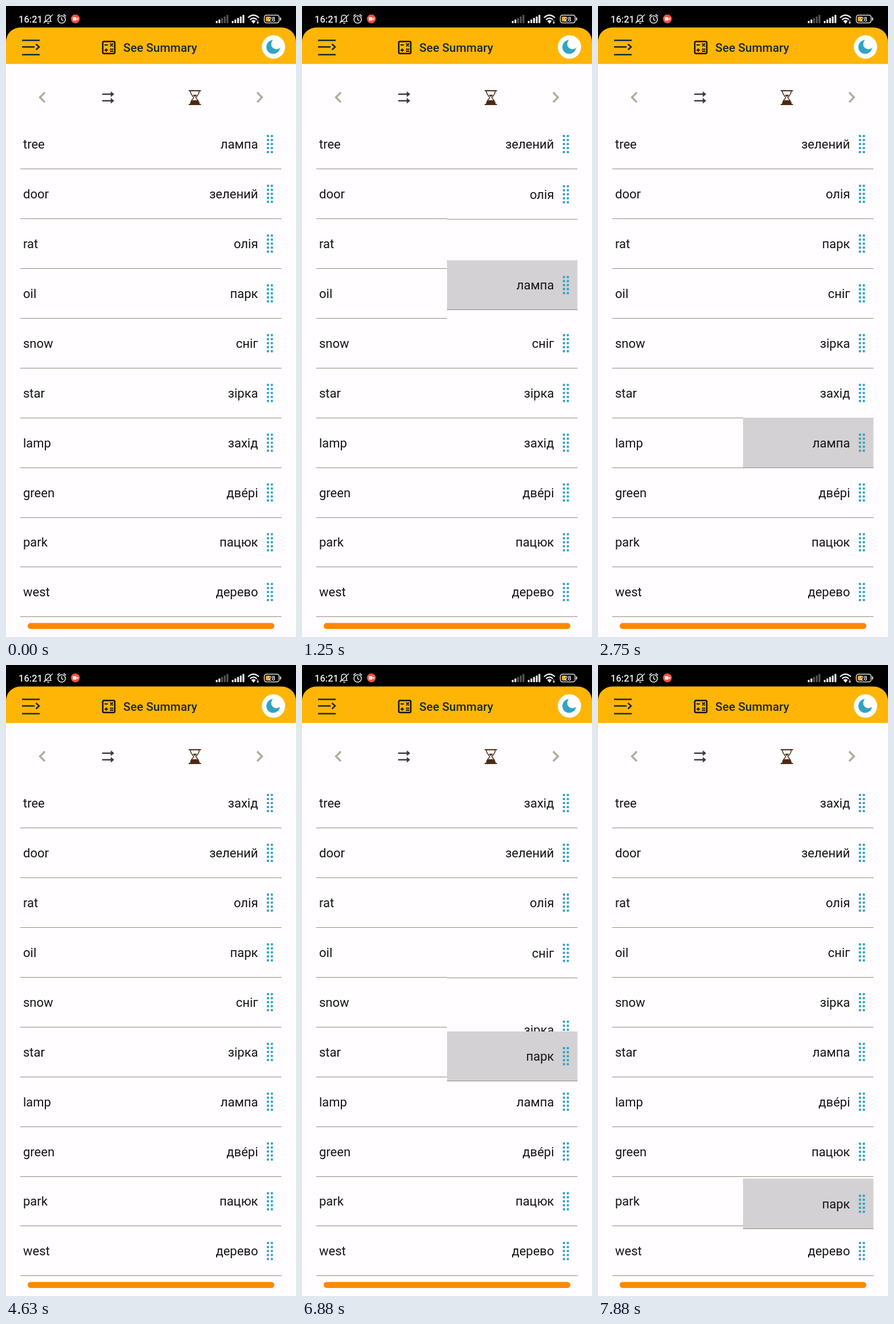
Animation of 508 by 1102 pixels, one loop 8 s. Source, as an HTML page with a canvas:

```html
<!DOCTYPE html>
<html lang="en">
<head>
<meta charset="utf-8">
<style>
html, body { margin: 0; width: 508px; height: 1102px; overflow: hidden; background: #fffdff; }
canvas { display: block; }
</style>
</head>
<body>
<canvas id="stage" width="508" height="1102"></canvas>
<script>
const ctx = document.getElementById('stage').getContext('2d');
const LOOP = 8000, ROW = 86.93, FIRST_LINE = 284.5;
const MID = 254, LEFT = 25, RIGHT = 482.5;
const NAVY = '#12283c', BLUE = '#30a4c4', BACK = '#fffdff', RULE = '#92897e';
const SWAP = 0.7, STIFFNESS = 0.018;

const words = ['tree', 'door', 'rat', 'oil', 'snow', 'star', 'lamp', 'green', 'park', 'west'];
const answers = ['лампа', 'зелений', 'олія', 'парк', 'сніг', 'зірка', 'захід', 'двéрі', 'пацюк', 'дерево'];

// Each path lists [time, rows travelled]
const drags = [
  { from: 0, to: 6, grab: 260, drop: 2870,
    path: [[400, 0], [540, 0.7], [1250, 2.83], [1700, 4.3], [2200, 6.05], [2600, 6.05], [2740, 6]] },
  { from: 5, to: 0, grab: 3280, drop: 4500,
    path: [[3450, 0], [3600, -0.5], [4050, -4], [4280, -5.05], [4380, -5.05], [4470, -5]] },
  { from: 3, to: 8, grab: 6130, drop: 8000,
    path: [[6280, 0], [6510, 0.7], [6797, 1.7], [6880, 2.08], [7200, 3.6], [7560, 5.05], [8000, 5.05]] }
];

function travel(path, t) {
  if (t <= path[0][0]) return 0;
  for (let i = 1; i < path.length; i++) {
    const [t0, p0] = path[i - 1], [t1, p1] = path[i];
    if (t <= t1) return p0 + (p1 - p0) * (t - t0) / (t1 - t0);
  }
  return path[path.length - 1][1];
}

function crossing(path, distance) {
  for (let i = 1; i < path.length; i++) {
    const t0 = path[i - 1][0], t1 = path[i][0];
    const p0 = Math.abs(path[i - 1][1]), p1 = Math.abs(path[i][1]);
    if (p0 < distance && p1 >= distance) return t0 + (t1 - t0) * (distance - p0) / (p1 - p0);
  }
  return Infinity;
}

function spring(ms) {
  if (ms <= 0) return 0;
  const x = ms * STIFFNESS;
  return 1 - (1 + x) * Math.exp(-x);
}

function box(color, x, y, w, h, r = 0) {
  ctx.fillStyle = color;
  ctx.beginPath();
  ctx.roundRect(x, y, w, h, r);
  ctx.fill();
}

function disc(color, x, y, r) {
  ctx.fillStyle = color;
  ctx.beginPath();
  ctx.arc(x, y, r, 0, 7);
  ctx.fill();
}

function line(color, width, d) {
  ctx.strokeStyle = color;
  ctx.lineWidth = width;
  ctx.stroke(new Path2D(d));
}

function shape(color, d) {
  ctx.fillStyle = color;
  ctx.fill(new Path2D(d));
}

function text(s, x, y, font, color = '#151515', align = 'left') {
  ctx.font = font + ' Roboto, sans-serif';
  ctx.fillStyle = color;
  ctx.textAlign = align;
  ctx.fillText(s, x, y);
}

function statusBar() {
  box('#000', 0, 0, 508, 70);
  text('16:21', 22, 29, '500 16.5px', '#eee');
  // muted bell and alarm clock
  line('#ddd', 1.6, 'M67 27H80M69 27V21Q69 16 73.5 16T78 21V27M72 30H76M66 30L82 15');
  line('#ddd', 1.7, 'M104 23.5A6.5 6.5 0 1 1 91 23.5A6.5 6.5 0 1 1 104 23.5M97.5 19.5V24L100.5 25.5M90 18L94 14.5M105 18L101 14.5');
  disc('#f4503f', 121.5, 22.5, 7.8);
  box('#fff', 117, 19.5, 6.5, 6, 1);
  shape('#fff', 'M124 22.5L126.5 20V25Z');
  for (let i = 0; i < 5; i++) {
    const h = 4 + i * 2.6;
    box(i < 2 ? '#eee' : '#555', 367.5 + i * 4.7, 30 - h, 3.2, h, 1);
    box('#eee', 395.5 + i * 4.7, 30 - h, 3.2, h, 1);
  }
  line('#eee', 2.3, 'M424 20.5Q433.5 11.5 443 20.5M427.5 24Q433.5 18.5 439.5 24');
  shape('#eee', 'M429.5 26Q433.5 23 437.5 26L433.5 31Z');
  line('#eee', 1.1, 'M441 25V30M439.5 28.5L441 30.5L442.5 28.5');
  ctx.strokeStyle = '#ddd';
  ctx.lineWidth = 1.6;
  ctx.beginPath();
  ctx.roundRect(452.5, 16, 26, 13.5, 4);
  ctx.stroke();
  box('#ddd', 480, 20, 2, 5.5, 1);
  box('#f5a623', 455, 18.5, 7, 8.5, 1.5);
  text('28', 465.5, 27, '500 11px', '#fff', 'center');
}

function header() {
  box('#ffb505', 0, 37.5, 508, 64, [25, 25, 0, 0]);
  line(NAVY, 2.5, 'M28 60H59M28 71.5H50M28 85H59M52.5 66.5L58 71.5L52.5 76.5');
  ctx.strokeStyle = '#111';
  ctx.lineWidth = 2.5;
  ctx.beginPath();
  ctx.roundRect(169.5, 62, 21, 21, 2);
  ctx.stroke();
  line('#111', 1.8, 'M172.5 68H178.5M182.5 65.5L187.5 70.5M187.5 65.5L182.5 70.5M172.5 77H178.5M175.5 74V80M182 75.5H188M182 79H188');
  text('See Summary', 205.5, 79.5, '500 20.8px', NAVY);
  disc('#fff', 468.5, 71.5, 20.5);
  shape(BLUE, 'M467.5 59.5A12 12 0 1 0 480 73A8 8 0 0 1 467.5 59.5Z');
}

function toolbar() {
  line('#b3a997', 3.3, 'M68 151L59.5 159.5L68 168');
  line('#b3a997', 3.3, 'M440 151L448.5 159.5L440 168');
  for (const y of [154, 165.5]) {
    line('#3b393e', 2.5, `M168.5 ${y}H185`);
    shape('#3b393e', `M183.5 ${y - 5}L189.5 ${y}L183.5 ${y + 5}Z`);
  }
  const brown = '#4c2914';
  line(brown, 2.2, 'M320 148H341.5M320 172H341.5');
  line(brown, 1.5, 'M323 148C323 155 327.5 157 329 160C327.5 163 323 165 323 172M338.5 148C338.5 155 334 157 332.5 160C334 163 338.5 165 338.5 172');
  shape(brown, 'M323 172C323 168 325 165.5 327 164.5H334.5C336.5 165.5 338.5 168 338.5 172ZM327 155H334.5L331 159Z');
}

function rule(x0, x1, y) {
  box(RULE, x0, Math.floor(y), x1 - x0, 1);
}

function answer(word, row, held) {
  const y = FIRST_LINE + row * ROW;
  if (held) box('#d3d1d3', MID, Math.round(y - ROW), RIGHT - MID, Math.round(ROW));
  text(word, 441.5, y - 35.5, '22px', '#151515', 'right');
  for (let i = 0; i < 10; i++) {
    box(BLUE, 457 + (i % 2) * 6.8, y - 59.3 + (i >> 1) * 7, 3.8, 3.8);
  }
  rule(MID, RIGHT, y);
}

function list(t) {
  words.forEach((word, i) => {
    const y = FIRST_LINE + i * ROW;
    text(word, 30, y - 35.5, '22px');
    rule(LEFT, MID, y);
  });

  const order = answers.slice();
  let active = null;
  for (const drag of drags) {
    if (t >= drag.drop) order.splice(drag.to, 0, order.splice(drag.from, 1)[0]);
    else if (t >= drag.grab) active = drag;
  }

  order.forEach((word, i) => {
    let row = i;
    if (active) {
      if (i === active.from) return;
      const dir = Math.sign(active.to - active.from);
      const gap = (i - active.from) * dir;
      if (gap > 0) row -= dir * spring(t - crossing(active.path, gap - 1 + SWAP));
    }
    answer(word, row, false);
  });
  if (active) answer(order[active.from], active.from + travel(active.path, t), true);
}

function draw(now) {
  box(BACK, 0, 0, 508, 1102);
  statusBar();
  header();
  box(BACK, 0, 101.5, 508, 1001);
  toolbar();
  list(now % LOOP);
  box('#ff8800', 38, 1077.5, 432, 10.5, 5);
}

const start = performance.now();
function tick() {
  draw(performance.now() - start);
  requestAnimationFrame(tick);
}
tick();
</script>
</body>
</html>
```
